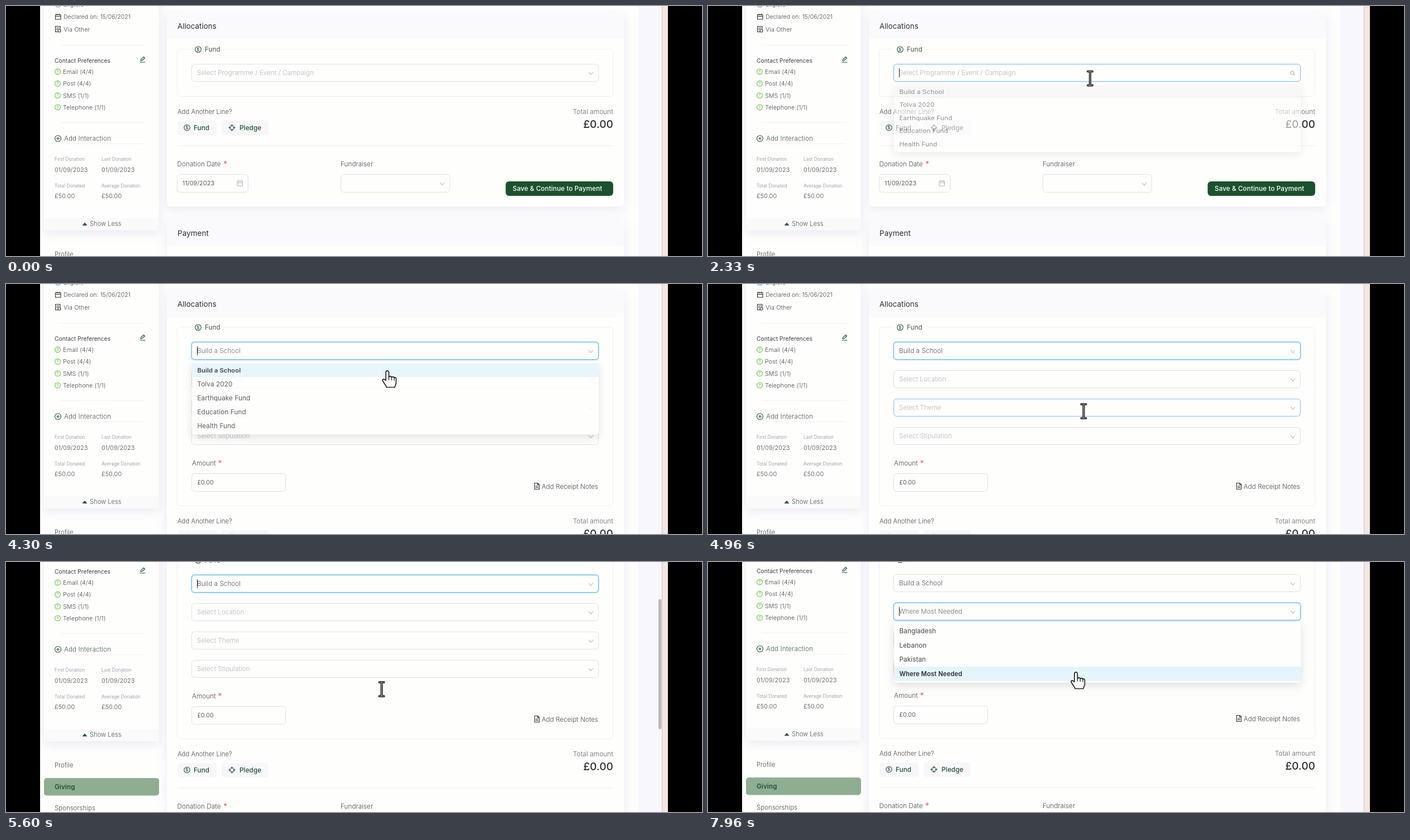
Animation of 1246 by 449 pixels, one loop 8000 ms. Source, as an HTML page:

```html
<!DOCTYPE html>
<html lang="en">
<head>
<meta charset="utf-8">
<title>Donation form</title>
<style>
  html, body { margin: 0; width: 100%; height: 100%; overflow: hidden; background: #000; }
  svg { display: block; width: 1246px; height: 449px; }
  text { font-family: Inter, "Open Sans", sans-serif; white-space: pre; letter-spacing: .1px; }
  .card { filter: drop-shadow(0 5px 9px rgba(214, 214, 240, .5)); }
  .menu { filter: drop-shadow(0 5px 8px rgba(0, 0, 0, .13)); }
</style>
</head>
<body>
<svg id="stage" viewBox="0 0 1246 449"></svg>
<script>
const LOOP = 8000, GROW = 236, SCROLL = 82, ROW = 25.6, PAD = 3.2;
const PICK_FUND = 4130, PICK_PLACE = 7930;
const INK = '#454548', DARK = '#2b2b2e', FAINT = '#b4b4b7', SOFT = '#85858f';
const GREEN = '#1d5136', LIME = '#62c33c', LINE = '#e1e1e3', RULE = '#f0f0f2', BLUE = '#62b5ec';

const stage = document.getElementById('stage');

function el(parent, tag, attrs = {}) {
  const node = document.createElementNS('http://www.w3.org/2000/svg', tag);
  set(node, attrs);
  parent.appendChild(node);
  return node;
}
function set(node, attrs) {
  for (const key in attrs) node.setAttribute(key, attrs[key]);
}
const group = (parent, attrs) => el(parent, 'g', attrs);
const show = (node, on) => { node.style.display = on ? '' : 'none'; };

function box(parent, x, y, width, height, fill, rx = 0, more = {}) {
  return el(parent, 'rect', { x, y, width, height, fill, rx, ...more });
}
function outline(parent, x, y, w, h, stroke = LINE, more = {}) {
  return box(parent, x + .5, y + .5, w - 1, h - 1, 'none', 5, { stroke, ...more });
}
function path(parent, d, stroke, width = 1, fill = 'none') {
  return el(parent, 'path', {
    d, stroke, fill, 'stroke-width': width, 'stroke-linecap': 'round', 'stroke-linejoin': 'round'
  });
}
function rule(parent, x1, x2, y) {
  box(parent, x1, y, x2 - x1, 1, RULE);
}
// y is the middle of the capital letters
function label(parent, x, y, words, size, fill = INK, weight = 300, anchor = 'start') {
  const node = el(parent, 'text', {
    x, y: y + size * .364, 'font-size': size, fill, 'font-weight': weight, 'text-anchor': anchor
  });
  node.textContent = words;
  return node;
}
function star(parent, x, y) {
  label(parent, x, y + 2.5, '*', 14, '#ee5b55', 400, 'middle');
}
function ring(parent, x, y, r, stroke, sign, size) {
  el(parent, 'circle', { cx: x, cy: y, r, fill: 'none', stroke, 'stroke-width': 1.1 });
  if (sign) label(parent, x, y, sign, size, stroke, 500, 'middle');
}
function calendar(parent, x, y, stroke) {
  path(parent, `M${x} ${y + 1.5}h9.5v8.5h-9.5zM${x} ${y + 4.5}h9.5M${x + 2.7} ${y}v2.5M${x + 6.8} ${y}v2.5`, stroke, 1.1);
}
function sheet(parent, x, y) {
  path(parent, `M${x} ${y}h5.5l3 3v8h-8.5zM${x + 5.5} ${y}v3h3M${x + 2} ${y + 5.5}h4.5M${x + 2} ${y + 8}h4.5`, DARK, 1.1);
}
function chevron(parent, x, y) {
  return path(parent, `M${x - 3.5} ${y - 2}l3.5 4.5 3.5-4.5`, '#b4b4b8', 1.1);
}

// fixed backdrop
box(stage, 61, 0, 1124, 449, '#fefefd');
box(stage, 1132, 0, 42, 449, '#f8f7fd');

const page = group(stage);

function sidebar() {
  const g = group(page);
  box(g, 68, -60, 205.5, 463, '#fefefd', 4, { class: 'card' });
  box(g, 68, 381, 205.5, 22, '#fafafb', 4);
  ring(g, 93, -3, 5, '#3a9cc4');
  label(g, 103, -3, 'Eligible', 10.7);
  calendar(g, 88.5, 14, DARK);
  label(g, 103, 19.5, 'Declared on: 15/06/2021', 10.4);
  path(g, 'M97 41v-4.5h-8.5v10h4M90.500 39.5h4.5M90.5 42h2', DARK, 1.1);
  ring(g, 95.5, 44.5, 2.5, DARK);
  label(g, 103, 42, 'Via Other', 10.8);
  rule(g, 96, 249, 70);
  label(g, 87, 98, 'Contact Preferences', 10.1, '#3a3a3e', 400);
  path(g, 'M240 101h9M241 98.5l.5-2.5 5-4.5 2 2-5 4.5z', GREEN, 1.1);
  ['Email (4/4)', 'Post (4/4)', 'SMS (1/1)', 'Telephone (1/1)'].forEach((words, i) => {
    const y = 118 + i * 21.3;
    ring(g, 92.5, y, 4.9, LIME, '?', 7.5);
    label(g, 102, y + .3, words, 10.7);
  });
  rule(g, 96, 249, 209);
  ring(g, 93, 238, 5.5, GREEN);
  path(g, 'M90.5 238h5M93 235.5v5', GREEN, 1.1);
  label(g, 104, 238, 'Add Interaction', 11.7, '#3f5c4f');
  rule(g, 104, 246, 247);
  [[87, 275, 'First Donation', '01/09/2023'], [171, 275, 'Last Donation', '01/09/2023'],
   [87, 322.5, 'Total Donated', '£50.00'], [171, 322.5, 'Average Donation', '£50.00']]
    .forEach(([x, y, name, value]) => {
      label(g, x, y, name, 8.25, SOFT);
      label(g, x, y + 19, value, 10.9);
    });
  path(g, 'M137.5 393.5l3.5-4 3.5 4z', GREEN, 1, GREEN);
  label(g, 150, 391, 'Show Less', 11, '#44584f');
  label(g, 87, 445.5, 'Profile', 11.1);
  box(g, 68, 469, 206, 31.5, '#8fae91', 5);
  label(g, 87, 484.5, 'Giving', 11.6, GREEN, 600);
  label(g, 87, 523, 'Sponsorships', 11.3);
}
sidebar();

// allocations card
const card = box(page, 288, 13, 818.5, 347, '#fefefd', 5, { class: 'card' });
box(page, 288, 13, 818.5, 46, '#fafafc', 5);
label(page, 307, 36.5, 'Allocations', 13.2, DARK, 400);
const frame = outline(page, 306, 77, 781, 86, '#efeff1');
box(page, 332, 75, 58, 6, '#fefefd');
ring(page, 344, 78, 5.3, GREEN, '$', 8);
label(page, 356, 78, 'Fund', 11.6, '#44544c', 400);

// part that moves down when the fund fields appear
const below = group(page);
label(below, 307, 190, 'Add Another Line?', 11.2);
[[307, 70.5, 'Fund', 29], [386, 84, 'Pledge', 32]].forEach(([x, w, words, indent]) => {
  box(below, x, 206, w, 26, '#f7f7fa', 5);
  label(below, x + indent, 218.5, words, 11.7, GREEN, 500);
});
ring(below, 324, 218.5, 5.2, GREEN, '$', 8);
ring(below, 404.5, 218.5, 4, GREEN);
path(below, 'M404.5 213v3M404.5 221v3M399 218.5h3M407 218.5h3', GREEN, 1.3);
label(below, 1087, 190, 'Total amount', 11.8, '#606064', 300, 'end');
label(below, 1087, 212, '£0.00', 18.9, DARK, 500, 'end');
rule(below, 307, 1087, 250.5);
label(below, 306.5, 283.5, 'Donation Date', 11.7);
star(below, 392.5, 281);
label(below, 599, 283.5, 'Fundraiser', 11.6);
outline(below, 306, 302, 128, 33);
label(below, 316, 318.5, '11/09/2023', 10.9, DARK);
calendar(below, 414, 313, '#b4b4b8');
outline(below, 599, 302, 196, 33);
chevron(below, 781, 319.5);
box(below, 894.5, 315, 192.5, 26, '#1b512c', 6);
label(below, 907, 328, 'Save & Continue to Payment', 11.7, '#fff', 500);
box(below, 288, 384, 818.5, 240, '#fefefd', 5, { class: 'card' });
box(below, 288, 384, 818.5, 47, '#fafafc', 5);
label(below, 307, 408.5, 'Payment', 13.4, DARK, 400);

// select fields
function field(parent, y, hint) {
  const f = {};
  f.ring = box(parent, 331.5, y - .5, 730, 33, 'none', 6, { stroke: '#cfe8fb', 'stroke-width': 2 });
  outline(parent, 332, y, 729, 32);
  f.edge = outline(parent, 332, y, 729, 32, BLUE);
  f.text = label(parent, 342, y + 15.5, hint, 11.6, FAINT);
  f.caret = box(parent, 342, y + 8, 1, 16, '#222');
  f.arrow = chevron(parent, 1047, y + 17);
  f.lens = group(parent);
  ring(f.lens, 1046, y + 16, 2.9, '#b4b4b8');
  path(f.lens, `M1048.3 ${y + 18.3}l2 2`, '#b4b4b8', 1.1);
  f.hint = hint;
  return f;
}
const fund = field(page, 104, 'Select Programme / Event / Campaign');
const extra = group(page);
const place = field(extra, 155, 'Select Location');
const theme = field(extra, 206, 'Select Theme');
const terms = field(extra, 257, 'Select Stipulation');
label(extra, 333, 321.5, 'Amount', 11.7);
star(extra, 383, 319.5);
outline(extra, 332, 340, 169, 33);
label(extra, 342.5, 356, '£0.00', 10.7, DARK);
sheet(extra, 946.3, 357.5);
label(extra, 959, 363.5, 'Add Receipt Notes', 11.5);

// drop-down lists
function menu(top, names) {
  const node = group(page);
  box(node, 333, 0, 728, names.length * ROW + PAD * 2, '#fefefd', 4, { class: 'menu' });
  const rows = names.map((name, i) => {
    const y = PAD + i * ROW;
    return {
      back: box(node, 333, y, 728, ROW, '#fefefd'),
      text: label(node, 342.5, y + ROW / 2, name, 11.7)
    };
  });
  return { node, top, rows };
}
const funds = menu(139, ['Build a School', 'Tolva 2020', 'Earthquake Fund', 'Education Fund', 'Health Fund']);
const places = menu(190, ['Bangladesh', 'Lebanon', 'Pakistan', 'Where Most Needed']);

// window edges and scroll thumb
const thumb = box(stage, 1168, 35, 5.5, 233.5, '#b9b9be', 2.7);
box(stage, 1174, 0, 1, 449, '#cfc8c8');
box(stage, 1175, 0, 10, 449, '#f3e6e1');
box(stage, 0, 0, 61, 449, '#000');
box(stage, 1185, 0, 61, 449, '#000');

// pointers
const pointers = { arrow: group(stage), beam: group(stage), hand: group(stage) };
path(pointers.arrow, 'M0 0V22.5l5-4.6 3.6 8.3 3.8-1.7-3.6-8H16z', '#222', 1.4, '#fff');
const beam = 'M-4-12.5H4M0-12.5V12.5M-4 12.5H4';
[['#2a2a2a', 4.2], ['#a5a5a5', 1.2]].forEach(([c, w]) => path(pointers.beam, beam, c, w));
path(pointers.hand, 'M-3 17V2.5a2.7 2.7 0 0 1 5.4 0V12c0-3 5-3 5 .3c0-2.5 4.6-2.2 4.6.8' +
  'c0-2 3.4-1.6 3.4 1.2V21c0 4-2 5.5-2.4 8.5H-2c0-3-2-4-3.5-6.5L-8.5 18' +
  'c-1.5-2.5 1.5-4.2 3.2-2.2z', '#222', 1.7, '#fff');
path(pointers.hand, 'M2.4 12v4M7.4 13v3.5M12 14v3', '#222', 1.3);

// time, x, y, and the shape from then on
const TRACK = [
  [660, 1040, -8, 'arrow'], [900, 820, 52], [1150, 615, 84], [1460, 682, 112],
  [1500, 685, 131, 'beam'], [1740, 685, 131], [1760, 684, 130], [2880, 684, 130],
  [3050, 686, 146, 'hand'], [3300, 688, 170], [3700, 683, 156], [4370, 683, 156, 'beam'],
  [4610, 683, 156], [4960, 672.5, 228.5], [5980, 672.5, 228.5], [6430, 664.5, 93],
  [6640, 663, 91], [6840, 663, 91], [6960, 663, 112, 'hand'], [7600, 659, 198], [LOOP, 659, 198]
];

const clamp = v => Math.min(1, Math.max(0, v));
const ramp = (t, a, b) => clamp((t - a) / (b - a));
const pulse = (t, a, b, fade = 200) => ramp(t, a, a + fade) - ramp(t, b, b + fade);

function pointerAt(t) {
  let i = 0, shape = 'arrow';
  while (i < TRACK.length - 1 && TRACK[i + 1][0] <= t) i++;
  for (let k = 0; k <= i; k++) shape = TRACK[k][3] || shape;
  const a = TRACK[i], b = TRACK[Math.min(i + 1, TRACK.length - 1)];
  const p = b === a ? 0 : ramp(t, a[0], b[0]);
  const q = t < 1460 ? p : p * p * (3 - 2 * p);
  return { x: a[1] + (b[1] - a[1]) * q, y: a[2] + (b[2] - a[2]) * q, shape };
}

function blink(t, from, to) {
  return t >= from && t < to && Math.floor((t - from) / 530) % 2 === 0;
}

function drawField(f, focus, hover, caret, value, open) {
  f.ring.style.opacity = focus;
  f.edge.style.opacity = Math.max(focus, hover * .8);
  f.text.textContent = value || f.hint;
  f.text.setAttribute('fill', value ? (open ? '#6c6c70' : '#505054') : FAINT);
  show(f.caret, caret);
  const lens = open && !value;
  show(f.lens, lens);
  show(f.arrow, !lens);
}

// opens with a quintic ease-out, closes with a quintic ease-in
function drawMenu(m, t, openAt, closeAt, picked, pointerY) {
  const shown = 1 - (1 - ramp(t, openAt, openAt + 200)) ** 5 - ramp(t, closeAt, closeAt + 200) ** 5;
  show(m.node, shown > 0);
  m.node.style.opacity = shown;
  m.node.setAttribute('transform', `translate(0 ${m.top}) scale(1 ${.8 + .2 * shown})`);
  const active = Math.min(m.rows.length - 1, Math.max(0, Math.floor((pointerY - m.top - PAD) / ROW)));
  m.rows.forEach((row, i) => {
    const chosen = i === picked;
    row.back.setAttribute('fill', chosen ? '#e5f5fc' : i === active ? '#f5f5f6' : '#fefefd');
    set(row.text, { 'font-weight': chosen ? 600 : 400, 'font-size': chosen ? 11.2 : 11.7, fill: chosen ? DARK : INK });
  });
}

function draw(t) {
  const scroll = Math.round(SCROLL * (1 - (1 - ramp(t, 5130, 5630)) ** 1.5));
  const grown = t >= PICK_FUND, settled = t >= PICK_PLACE;
  const at = pointerAt(t);

  page.setAttribute('transform', `translate(0 ${-scroll})`);
  below.setAttribute('transform', `translate(0 ${grown ? GROW : 0})`);
  card.setAttribute('height', 347 + (grown ? GROW : 0));
  frame.setAttribute('height', 85 + (grown ? GROW : 0));
  show(extra, grown);

  drawField(fund, pulse(t, 2300, 6640, 160), pulse(t, 1480, 2600, 120),
    blink(t, 2130 + (t > 2300 ? 40 : 0), 6640), grown && 'Build a School', t >= 2130 && t < 4370);
  drawField(place, ramp(t, 6640, 6840), pulse(t, 4370, 4680) + ramp(t, 6440, 6640),
    blink(t, 6640, LOOP), settled && 'Where Most Needed', t >= 6640);
  drawField(theme, 0, pulse(t, 4780, 5310), false);
  drawField(terms, 0, 0, false);

  drawMenu(funds, t, 2298, 4170, grown ? 0 : -1, at.y + scroll);
  drawMenu(places, t, 6800, LOOP, settled ? 3 : -1, at.y + scroll);

  thumb.setAttribute('y', 35.5 + scroll * .385);
  thumb.style.opacity = t < 5130 ? 0 : 1 - ramp(t, 6950, 7150);

  for (const name in pointers) {
    show(pointers[name], t >= 660 && name === at.shape);
    pointers[name].setAttribute('transform', `translate(${at.x} ${at.y})`);
  }
}

function tick() {
  draw(performance.now() % LOOP);
  requestAnimationFrame(tick);
}
tick();
</script>
</body>
</html>
```
